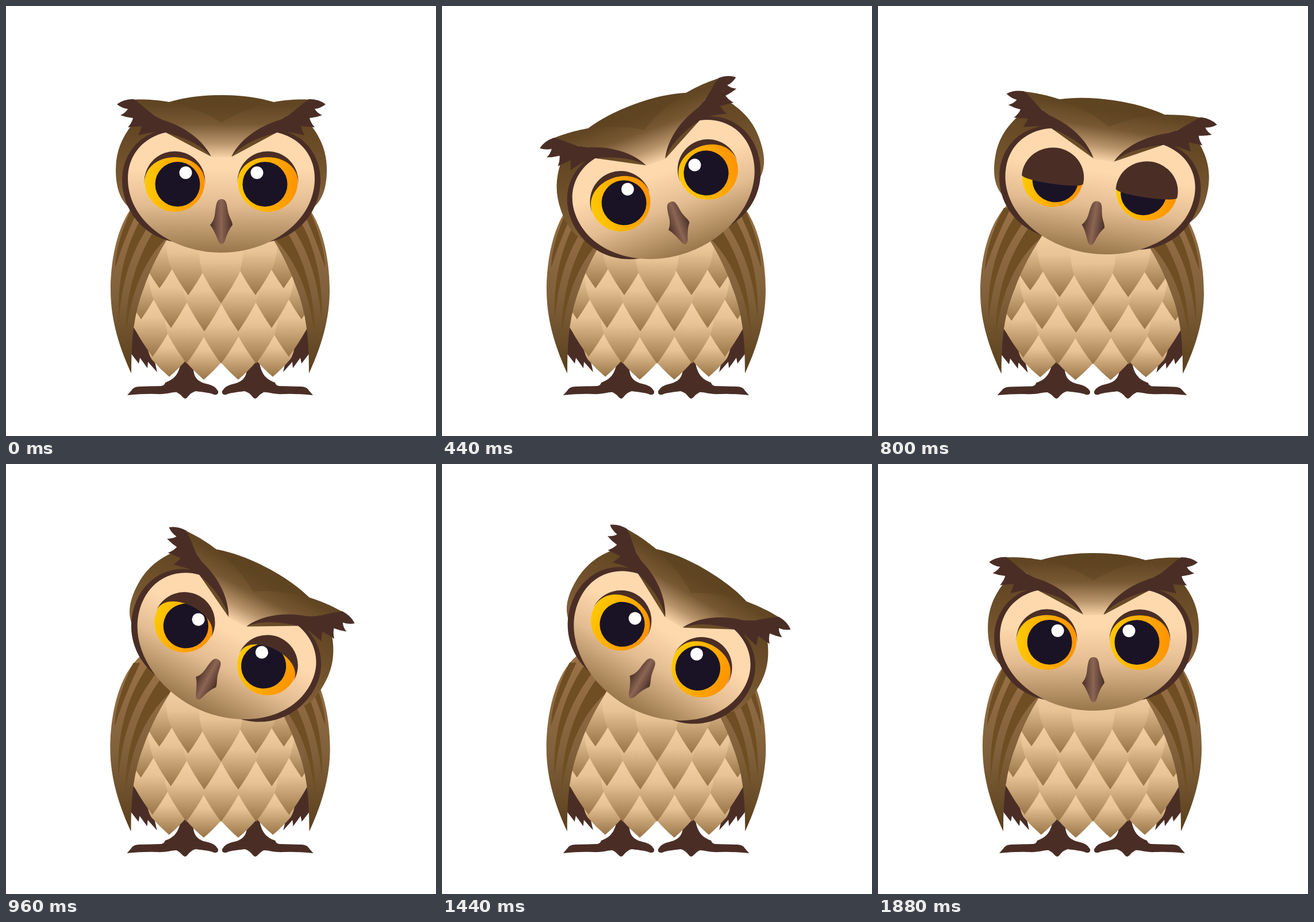
These frames come from a looping animation (748 px wide and 748 px high, 1920 ms). An HTML page:

```html
<!DOCTYPE html>
<html lang="en">
<head>
<meta charset="utf-8">
<title>Owl</title>
<style>
  html, body { margin: 0; width: 100%; height: 100%; overflow: hidden; background: #fff; }
  svg { display: block; width: 100vw; height: 100vh; }
</style>
</head>
<body>
<svg viewBox="0 0 748 748">
  <defs>
    <linearGradient id="feather" x2="0" y2="1">
      <stop offset=".08" stop-color="#f1cda1"/><stop offset=".35" stop-color="#e8c396"/><stop offset="1" stop-color="#987446"/>
    </linearGradient>
    <linearGradient id="wingFill" gradientUnits="userSpaceOnUse" x1="0" y1="340" x2="0" y2="639">
      <stop stop-color="#9b7247"/><stop offset=".55" stop-color="#80603a"/><stop offset="1" stop-color="#593f1c"/>
    </linearGradient>
    <linearGradient id="backFill" x2="0" y2="1">
      <stop offset=".1" stop-color="#614522"/><stop offset=".55" stop-color="#775730"/><stop offset=".9" stop-color="#8f6d45"/>
    </linearGradient>
    <linearGradient id="faceFill" gradientUnits="userSpaceOnUse" x1="0" y1="220" x2="0" y2="430">
      <stop offset=".3" stop-color="#ffd9ae"/><stop offset=".6" stop-color="#e3bd91"/><stop offset="1" stop-color="#98754a"/>
    </linearGradient>
    <linearGradient id="capFill" gradientUnits="userSpaceOnUse" x1="0" y1="155" x2="0" y2="266">
      <stop offset=".15" stop-color="#614623"/><stop offset=".45" stop-color="#775833"/>
      <stop offset=".75" stop-color="#b8946a"/><stop offset="1" stop-color="#ffd9ae"/>
    </linearGradient>
    <linearGradient id="beakFill">
      <stop stop-color="#4a2e26"/><stop offset=".5" stop-color="#8c6553"/><stop offset="1" stop-color="#4a2e26"/>
    </linearGradient>
    <linearGradient id="iris">
      <stop stop-color="#ffc800"/><stop offset="1" stop-color="#ff9300"/>
    </linearGradient>
  </defs>

  <g id="owl">
    <g id="foot" fill="#4a2e26">
      <path d="M305 612C303 640 292 650 277 655Q276 660 270 661L232 662Q222 662 218 669L211 677Q240 674 262 675C280 676 290 671 297 672Q303 675 307 680Q312 686 316 680Q322 672 330 670C345 672 356 673 362 676Q370 677 369 670Q364 660 348 657C336 654 327 648 326 632V612Z"/>
      <path d="M219 553L217 604L231 622L233 612L246 630L247 619L263 637L256 606Z"/>
    </g>
    <use href="#foot" transform="translate(745) scale(-1 1)"/>
    <path fill="#e9c599" d="M290 395C250 440 222 510 219 555L255 605H492L526 555C525 510 500 440 460 395Z"/>
    <g id="belly" fill="url(#feather)"></g>
    <g id="wing">
      <path fill="url(#wingFill)" d="M290 310C205 315 182 420 182 495C182 550 200 600 218 639C218 590 220 540 240 490C252 455 268 425 285 398L312 350Z"/>
      <g fill="#6f4e23">
        <path d="M222 345C200 390 190 430 190 455C200 425 208 400 234 345Z"/>
        <path d="M246 352C207 410 193 480 196 545C203 480 215 425 262 362Z"/>
        <path d="M270 372C228 430 207 500 208 577C216 500 240 440 283 400L296 378Z"/>
      </g>
    </g>
    <use href="#wing" transform="translate(745) scale(-1 1)"/>

    <g id="head">
      <path fill="url(#backFill)" d="M222 203C200 230 191 255 191 285C191 315 198 338 216 352L300 400H449L533 352C551 338 558 315 558 285C558 255 549 230 527 203L449 180H300Z"/>
      <g id="ring">
        <path fill="#4a2e26" d="M278 215C228 222 202 262 202 302C202 360 245 408 305 412L340 300Z"/>
      </g>
      <use href="#ring" transform="translate(749) scale(-1 1)"/>
      <path fill="url(#faceFill)" d="M278 220C240 228 212 258 212 300C212 375 290 429 374.500 429C459 429 537 375 537 300C537 258 509 228 471 220L393 262H357Z"/>
      <path fill="url(#capFill)" d="M215 163C250 161 270 165 284 167C310 159 340 155 374.500 155C409 155 439 159 465 167C479 165 499 161 534 163L477 199C443 209 409 230 392 263H357C340 230 306 209 272 199Z"/>
      <path fill="#5b401f" opacity=".45" d="M284 167Q340 180 374.500 203Q409 180 465 167Q374.500 143 284 167Z"/>
      <g id="brow">
        <path fill="#4a2e26" d="M193 171Q204 162 222 162C238 172 250 188 272 198C306 208 340 229 357 262C340 242 312 229 278 220C268 218 258 219 248 221L230 225Q234 217 236 209Q222 210 212 211Q219 203 221 195Q210 194 199 190Q208 186 212 179Q202 178 193 171Z"/>
      </g>
      <use href="#brow" transform="translate(749) scale(-1 1)"/>
      <g id="eyes"></g>
      <path fill="url(#beakFill)" d="M375 336C384 336 384 345 386 356C388 368 394 374 394 381C388 388 384 398 381 408Q375 421 369 408C365 398 361 388 355 381C361 374 363 368 364 356C366 345 366 336 375 336Z"/>
    </g>
  </g>
</svg>
<script>
const $ = id => document.getElementById(id);
const LOOP = 1920, STEP = 40;

// Belly feathers: rows from the lowest to the highest, each [x, tip y].
const rows = [
  { drop: 31, height: 78, tips: [[284, 645], [464, 645], [344, 650], [404, 650]] },
  { drop: 48, height: 105, tips: [[255, 610], [492, 610], [314, 622], [435, 622], [374, 622]] },
  { drop: 51, height: 108, tips: [[235, 545], [514, 545], [287, 560], [462, 560], [345, 566], [404, 566]] },
  { drop: 50, height: 115, tips: [[267, 491], [483, 491], [317, 503], [434, 503], [374, 517]] }
];

function feather(x, tip, drop, height) {
  const side = s => `${x + s * 31} ${tip - drop}`;
  const bend = s => `${x + s * 17} ${tip - drop * 0.47}`;
  const shoulder = s => `${x + s * 42} ${tip - drop * 1.6}`;
  const top = s => `${x + s * 36} ${tip - height}`;
  return `<path d="M${x} ${tip}Q${bend(1)} ${side(1)}Q${shoulder(1)} ${top(1)}` +
    `L${top(-1)}Q${shoulder(-1)} ${side(-1)}Q${bend(-1)} ${x} ${tip}Z"/>`;
}

$('belly').innerHTML = rows.map(r =>
  r.tips.map(([x, y]) => feather(x, y, r.drop, r.height)).join('')).join('');

$('eyes').innerHTML = [-1, 1].map(s => `
  <g transform="translate(${374.5 + s * 81} 306)">
    <circle r="52" fill="url(#iris)"/>
    <circle cx="${-s * 5}" cy="4" r="39" fill="#1a1326"/>
    <circle cx="${-s * 19}" cy="-16" r="11" fill="#fff"/>
    <path class="lid" fill="#4a2e26"/>
  </g>`).join('');
const lids = document.querySelectorAll('.lid');

const clamp = x => Math.min(1, Math.max(0, x));
const mix = (a, b, k) => a + (b - a) * k;

// The standard "ease" curve, cubic-bezier(.25, .1, .25, 1).
function ease(x) {
  const curve = (a, b, u) => 3 * a * u * (1 - u) ** 2 + 3 * b * u * u * (1 - u) + u ** 3;
  let lo = 0, hi = 1;
  for (let i = 0; i < 24; i++) {
    const mid = (lo + hi) / 2;
    if (curve(0.25, 0.25, mid) < x) lo = mid; else hi = mid;
  }
  return curve(0.1, 1, lo);
}

const rest = { x: 374, y: 306, turn: 0 };
const left = { x: 386.4, y: 312.9, turn: -20.2 };
const right = { x: 381.2, y: 313.5, turn: 32.2 };

// Each move: head turn, blink times, and a squash of the whole body.
const moves = [
  { start: 0, turn: [0, 520], from: rest, to: left, shut: [30, 130], held: 150, open: 440, bump: 420, squash: 0.02, lift: 4 },
  { start: 600, turn: [640, 1140], from: left, to: right, shut: [600, 700], held: 700, open: 1100, bump: 415, squash: 0.021, lift: 10 },
  { start: 1400, turn: [1400, 1920], from: right, to: rest, shut: [1440, 1550], held: 1565, open: 1860, bump: 440, squash: 0.02, lift: 4 }
];

const LID_OPEN = -43, LID_SHUT = 53, LID_SIDE = 3, SWAY = 1.5;

function lidPath(edge) {
  const pull = LID_SIDE + (edge - LID_SIDE) * 4 / 3;
  return `M-52.9 ${LID_SIDE}A53 53 0 1 1 52.9 ${LID_SIDE}C52.9 ${pull} -52.9 ${pull} -52.9 ${LID_SIDE}Z`;
}

function draw(time) {
  const t = Math.floor((time % LOOP) / STEP) * STEP;
  const m = moves.filter(v => t >= v.start).pop();
  const span = ([a, b]) => clamp((t - a) / (b - a));
  const k = ease(span(m.turn));
  const bump = Math.sin(Math.PI * span([m.start, m.start + m.bump])) ** 2;
  const pose = key => mix(m.from[key], m.to[key], k);
  const closed = t < m.held ? span(m.shut) : (1 - span([m.held, m.open])) ** 2;

  const squash = m.squash * bump;
  $('owl').setAttribute('transform',
    `translate(373 683) scale(${1 + squash} ${1 - squash * 0.9}) translate(-373 -683)`);
  $('head').setAttribute('transform',
    `translate(${pose('x') + SWAY * bump} ${pose('y') - m.lift * bump}) rotate(${pose('turn')}) translate(-374 -306)`);
  const d = lidPath(mix(LID_OPEN, LID_SHUT, closed));
  lids.forEach(lid => lid.setAttribute('d', d));
}

const begin = performance.now();
function tick() {
  draw(performance.now() - begin);
  requestAnimationFrame(tick);
}
tick();
</script>
</body>
</html>
```
